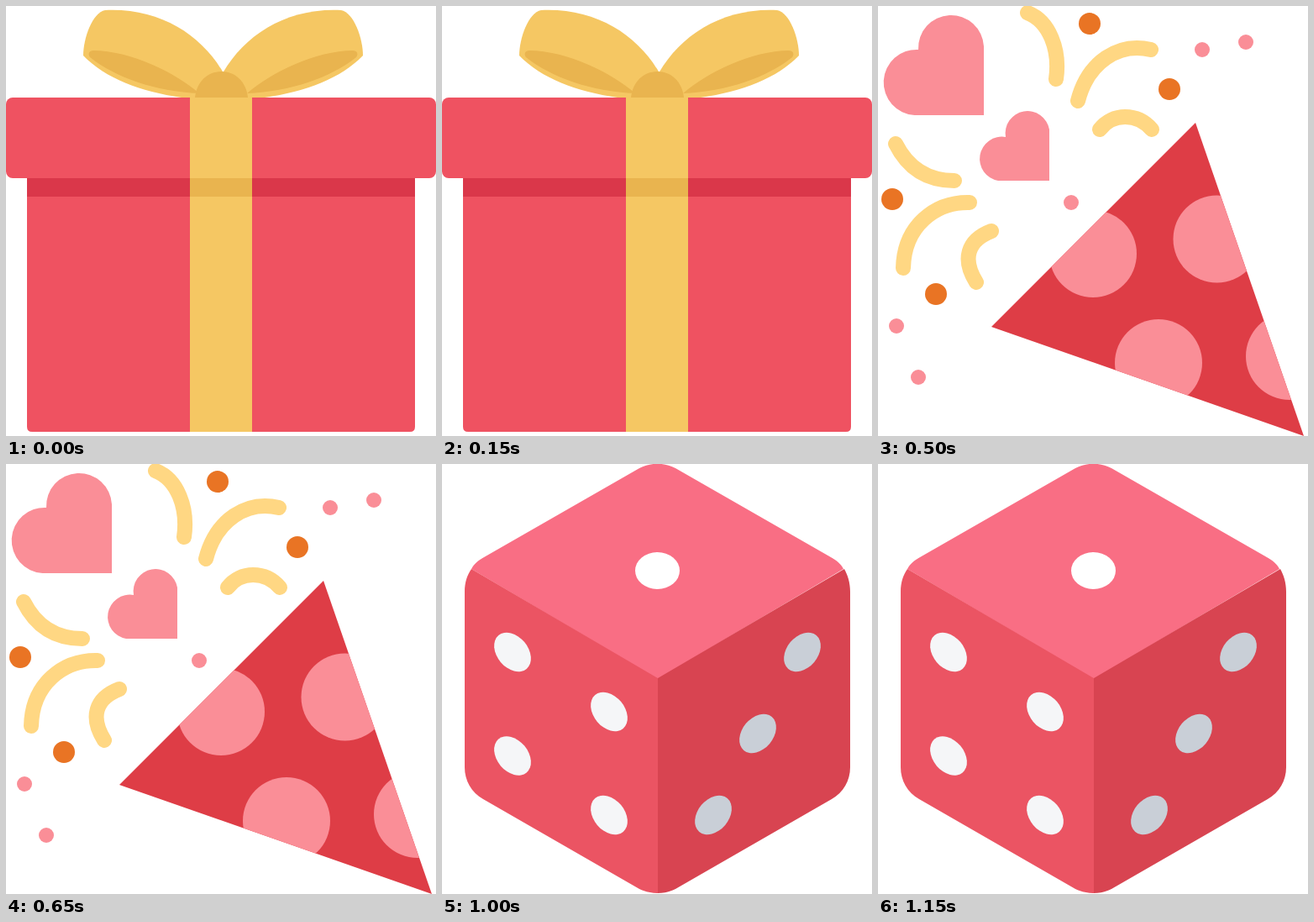
Animation of 512 by 512 pixels, one loop 1.25 s. Source, as an HTML page:

```html
<!DOCTYPE html>
<html lang="en">
<head>
<meta charset="utf-8">
<title>Lucky icons</title>
<style>
  html, body { margin: 0; width: 100%; height: 100%; overflow: hidden; background: #fff; }
  svg { display: block; width: 100%; height: 100%; }
  .icon { visibility: hidden; animation: show 1250ms step-end infinite; animation-delay: calc((var(--i) - 5) * 250ms); }
  @keyframes show {
    0% { visibility: visible; }
    20%, 100% { visibility: hidden; }
  }
</style>
</head>
<body>
<svg viewBox="0 0 512 512">
  <defs>
    <g id="loop">
      <path fill="#f5c763" d="M258.500 79C232 34 183 2 118 5C103 8 92 38 92 59C118 86 160 102 209 109H258.500Z"/>
      <path fill="#e9b44f" d="M104 53C148 53 203 80 230 104C178 102 130 85 100 61C97 57 99 53 104 53Z"/>
    </g>

    <clipPath id="cone"><path d="M378 139L507 512L135 382Z"/></clipPath>

    <linearGradient id="lightHalf" gradientUnits="userSpaceOnUse" x1="200" x2="256" y1="0" y2="0">
      <stop stop-color="#7dc943"/><stop offset="1" stop-color="#66c045"/>
    </linearGradient>
    <linearGradient id="darkHalf" gradientUnits="userSpaceOnUse" x1="256" x2="332" y1="0" y2="0">
      <stop stop-color="#57b948"/><stop offset="1" stop-color="#3ab54a"/>
    </linearGradient>
    <radialGradient id="lightShade" gradientUnits="userSpaceOnUse" cx="256" cy="256" r="165">
      <stop stop-color="#0f8443"/>
      <stop offset=".3" stop-color="#2fa148"/>
      <stop offset=".6" stop-color="#55b747" stop-opacity=".85"/>
      <stop offset="1" stop-color="#7dc943" stop-opacity="0"/>
    </radialGradient>
    <radialGradient id="darkShade" gradientUnits="userSpaceOnUse" cx="256" cy="256" r="140">
      <stop stop-color="#0f8443"/>
      <stop offset=".3" stop-color="#178c45"/>
      <stop offset="1" stop-color="#3ab54a" stop-opacity="0"/>
    </radialGradient>
    <g id="leaf">
      <path fill="url(#lightHalf)" d="M256 256L153 142C137 126 127 104 127 82C127 37 160 0 201 0C215 0 228 4 239 11C244 14 250 15.500 256 15.500Z"/>
      <path id="rightHalf" fill="url(#darkHalf)" d="M256 256L359 142C375 126 385 104 385 82C385 37 352 0 311 0C297 0 284 4 273 11C268 14 262 15.500 256 15.500Z"/>
      <path fill="url(#lightShade)" d="M256 256L177 168.500C163 150 158 126 162 98L256 80Z"/>
      <path fill="url(#darkShade)" d="M256 256L359 142L385 82H256Z"/>
    </g>

    <ellipse id="pip" rx="26" ry="18.500" transform="rotate(50)"/>
    <ellipse id="pipBack" rx="26" ry="18.500" transform="rotate(-50)"/>
  </defs>

  <!-- Gift -->
  <g class="icon" style="--i:0">
    <use href="#loop"/>
    <use href="#loop" transform="matrix(-1 0 0 1 517 0)"/>
    <path fill="#e9b44f" d="M225 109C227 90 240 78 256.500 78S286 90 288 109Z"/>
    <path fill="#ef5261" d="M25 200H487V501Q487 507 481 507H31Q25 507 25 501Z"/>
    <path fill="#da374a" d="M25 205H487V227H25Z"/>
    <rect fill="#ef5261" y="109" width="512" height="96" rx="8"/>
    <path fill="#f5c763" d="M219 109H293V507H219Z"/>
    <path fill="#e9b44f" d="M219 205H293V227H219Z"/>
  </g>

  <!-- Prize wheel -->
  <g class="icon" style="--i:1">
    <path fill="#545577" d="M168 426H344L362 484H150Z"/>
    <rect fill="#656688" x="122" y="482" width="268" height="28" rx="14"/>
    <g transform="translate(256 240)">
      <circle r="206" fill="#656688"/>
      <g id="sectors"></g>
      <circle r="62" fill="#fff"/>
      <circle r="28" fill="#656688"/>
    </g>
    <path fill="#fd6f96" d="M224 2H288C298 2 305 11 301 21L269 101C264 113 248 113 243 101L211 21C207 11 214 2 224 2Z"/>
  </g>

  <!-- Party popper -->
  <g class="icon" style="--i:2">
    <g fill="#fa8e97">
      <path d="M126 130H43.500A39 39 0 1 1 48 52A39 39 0 0 1 126 48Z"/>
      <path d="M204 208H143A26 26 0 1 1 152 156A26 26 0 0 1 204 147Z"/>
      <circle cx="386" cy="52" r="9"/>
      <circle cx="438" cy="43" r="9"/>
      <circle cx="230" cy="234" r="9"/>
      <circle cx="22" cy="381" r="9"/>
      <circle cx="48" cy="442" r="9"/>
    </g>
    <g fill="#e97424">
      <circle cx="252" cy="21" r="13"/>
      <circle cx="347" cy="99" r="13"/>
      <circle cx="17" cy="230" r="13"/>
      <circle cx="69" cy="343" r="13"/>
    </g>
    <path fill="none" stroke="#ffd783" stroke-width="18" stroke-linecap="round"
      d="M178 8C204 18 217 52 212 87M238 113C250 66 287 43 325 52M264 147C279 127 309 127 326 147M21 164C37 196 62 208 91 208M30 312C31 262 68 233 109 234M135 268C106 279 100 302 117 329"/>
    <g clip-path="url(#cone)">
      <path fill="#de3d46" d="M100 130H512V512H100Z"/>
      <g fill="#fa8e97">
        <circle cx="256" cy="295" r="52"/>
        <circle cx="403.500" cy="277.500" r="52"/>
        <circle cx="334" cy="425" r="52"/>
        <circle cx="490" cy="417" r="52"/>
      </g>
    </g>
  </g>

  <!-- Clover -->
  <g class="icon" style="--i:3">
    <use href="#leaf"/>
    <use href="#leaf" transform="rotate(90 256 256)"/>
    <use href="#leaf" transform="rotate(180 256 256)"/>
    <use href="#leaf" transform="rotate(270 256 256)"/>
  </g>

  <!-- Die -->
  <g class="icon" style="--i:4">
    <path fill="#f96e84" d="M35 125C38 119 43 115 50 111L235 5C248 -2 265 -2 278 5L463 111C470 115 475 119 478 125L257 256Z"/>
    <path fill="#eb5463" d="M35 125L257 255V511C249 511 241 509 235 506L49 399C35 391 27 377 27 361V152C27 141 30 132 35 125Z"/>
    <path fill="#d84451" d="M479 125L257 255V511C265 511 272 509 278 506L464 399C478 391 486 377 486 361V152C486 141 483 132 479 125Z"/>
    <ellipse fill="#fff" cx="256.500" cy="127" rx="26.500" ry="22"/>
    <g fill="#f5f6f8">
      <use href="#pip" x="84" y="224"/>
      <use href="#pip" x="199" y="295"/>
      <use href="#pip" x="84" y="347.500"/>
      <use href="#pip" x="199" y="418"/>
    </g>
    <g fill="#c9cfd7">
      <use href="#pipBack" x="429" y="224"/>
      <use href="#pipBack" x="376" y="321"/>
      <use href="#pipBack" x="323" y="418"/>
    </g>
  </g>
</svg>
<script>
  const colors = ['#6fe8a0', '#a8ffff', '#fd6f96', '#fff06e'];
  const radius = 178, edge = radius * Math.SQRT1_2;
  document.getElementById('sectors').innerHTML = Array.from({ length: 8 }, (_, i) =>
    `<path fill="${colors[i % 4]}" transform="rotate(${i * 45})" d="M0 0V${-radius}A${radius} ${radius} 0 0 1 ${edge} ${-edge}Z"/>`
  ).join('');
</script>
</body>
</html>
```
